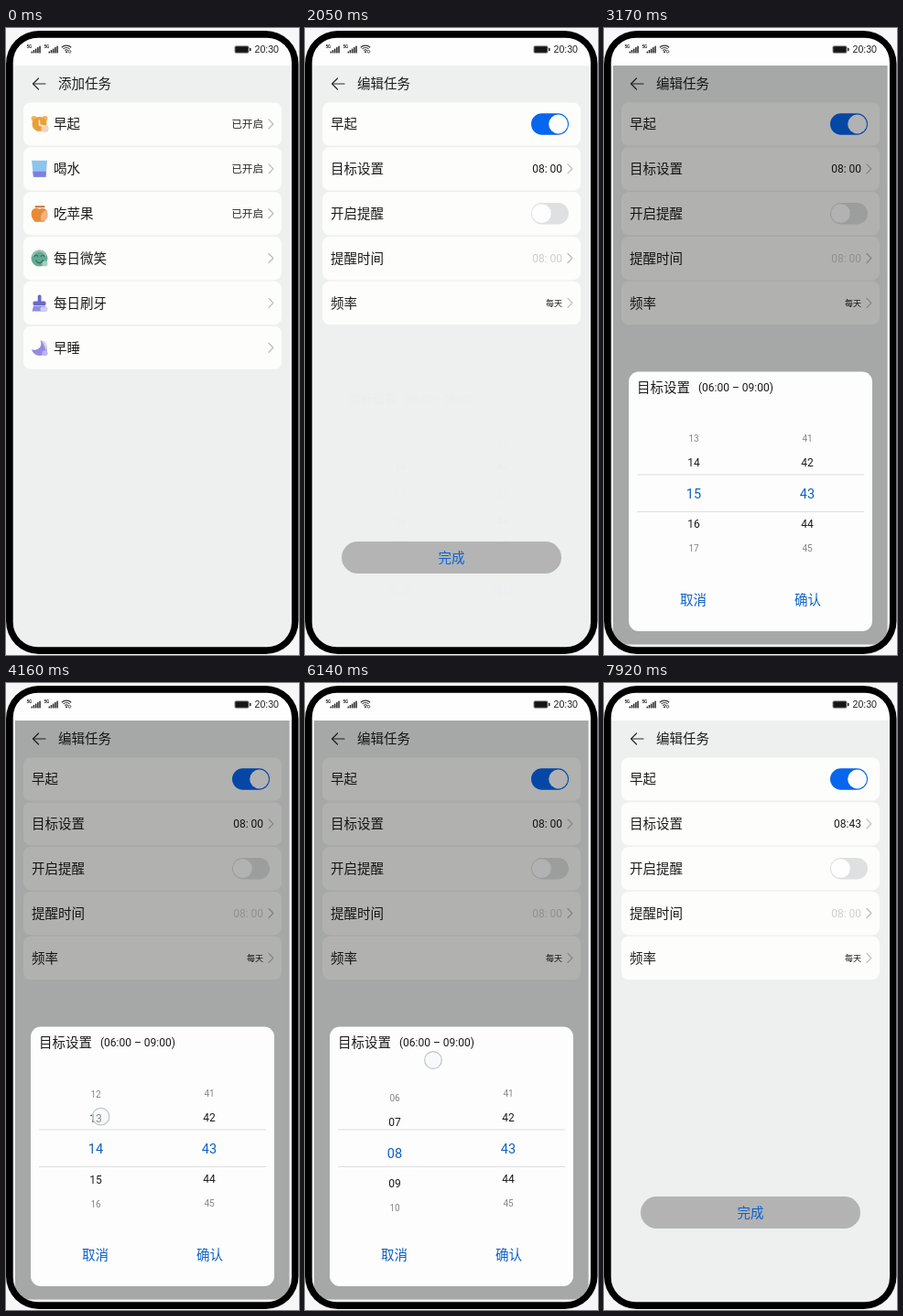
Write an HTML page with a canvas that moves like this. It is 320 by 685 pixels and loops after 8 s.

```html
<!DOCTYPE html>
<html lang="zh">
<head>
<meta charset="utf-8">
<title>添加任务</title>
<style>
html, body { margin: 0; width: 100%; height: 100%; overflow: hidden; background: #f7f7fa; }
canvas { display: block; width: 320px; height: 685px; }
</style>
</head>
<body>
<canvas id="stage"></canvas>
<script>
const W = 320, H = 685, LOOP = 8000;
const canvas = document.getElementById('stage');
const c = canvas.getContext('2d');
const dpr = window.devicePixelRatio || 1;
canvas.width = W * dpr;
canvas.height = H * dpr;

const CJK = '"Noto Sans CJK SC", "Noto Sans CJK", sans-serif';
const NUM = 'Roboto, "Noto Sans CJK SC", sans-serif';
const BLUE = '#0b5fc4', INK = '#1b1b1c';
const TASKS = ['早起', '喝水', '吃苹果', '每日微笑', '每日刷牙', '早睡'];
const SETTINGS = ['早起', '目标设置', '开启提醒', '提醒时间', '频率'];

// Each swipe: start time, x, y, hour before, hour after
const SWIPES = [
  [3420, 100, 468, 15, 14],
  [4130, 103, 472, 14, 12],
  [4800, 106, 468, 12, 10],
  [5430, 108, 466, 10, 8]
];
const DRAG = 330, SETTLE = 500;

const clamp = x => Math.max(0, Math.min(1, x));
const span = (t, a, b) => clamp((t - a) / (b - a));
const easeOut = x => 1 - (1 - x) ** 3;
const smooth = x => x * x * (3 - 2 * x);
const rowY = i => 105 + i * 48.85;

function text(s, x, y, size, color, o = {}) {
  c.font = `${o.weight || 400} ${size}px ${o.font || CJK}`;
  c.textAlign = o.align || 'left';
  c.fillStyle = color;
  c.fillText(s, x, y + size * 0.365);
}

function box(x, y, w, h, r, color) {
  c.fillStyle = color;
  c.beginPath();
  c.roundRect(x, y, w, h, r);
  c.fill();
}

function disc(x, y, r, color) {
  c.fillStyle = color;
  c.beginPath();
  c.arc(x, y, r, 0, 7);
  c.fill();
}

function line(points, color, width) {
  c.strokeStyle = color;
  c.lineWidth = width;
  c.lineCap = c.lineJoin = 'round';
  c.beginPath();
  points.forEach(([x, y], i) => i ? c.lineTo(x, y) : c.moveTo(x, y));
  c.stroke();
}

function arc(x, y, r, a, b, color, width) {
  c.strokeStyle = color;
  c.lineWidth = width;
  c.beginPath();
  c.arc(x, y, r, a, b);
  c.stroke();
}

function shape(path, color) {
  c.fillStyle = color;
  c.fill(new Path2D(path));
}

function chevron(y) {
  line([[287, y - 5], [291.8, y], [287, y + 5]], '#bdbdbf', 1.3);
}

function toggle(y, on) {
  box(247, y - 11.7, 41, 23.4, 11.7, on ? '#0766ee' : '#dfe0e1');
  disc(on ? 276.6 : 258.4, y, 10.4, '#fefefe');
}

// Icons are drawn around 0,0
const icons = [
  () => {
    disc(-6, -6, 3, '#f0b45a');
    disc(6, -6, 3, '#f0b45a');
    disc(0, 0, 8, '#e9a03b');
    disc(6, 5, 4, '#f2d3bd');
    line([[0, -4], [0, 1], [4, 2]], '#fff3df', 1.5);
  },
  () => {
    shape('M-8.5 -9H8.5L7 9H-6.5Z', '#8cc4ee');
    shape('M-7.3 3H7.4L7 9H-6.5Z', '#7d7fe0');
  },
  () => {
    shape('M0 -5C10 -9 11 3 5 9H-5C-12 2 -9 -9 0 -5Z', '#e98a35');
    shape('M2 8C0 0 5 -4 8 -3C11 3 8 9 2 8Z', '#f0b189');
    line([[-4, -7.5], [5, -7.5]], '#b8763c', 2);
  },
  () => {
    disc(0, 0, 9, '#62ab93');
    arc(0, 0, 8, 3.5, 5.9, '#9fbfb3', 2);
    disc(6, 6, 3, '#a9cfc2');
    arc(-3.5, -1.5, 1.8, 3.3, 6.1, '#2f6d5a', 1.2);
    arc(3.5, -1.5, 1.8, 3.3, 6.1, '#2f6d5a', 1.2);
    arc(0, 1, 4, 0.3, 2.8, '#2f6d5a', 1.3);
  },
  () => {
    box(-1.8, -9, 3.8, 9, 1.5, '#6c68c9');
    box(-7, -2, 14, 4.5, 1.5, '#6c68c9');
    shape('M-6.5 3H6.5L8 9H-8Z', '#8f8ce0');
    box(1, 4, 8, 5, 2, '#d3d0ee');
  },
  () => {
    shape('M1 -8C4 -2 -1 4 -8.5 2C-6 11 8 11 8.5 1C8.5 -3 5 -7 1 -8Z', '#9488e4');
    shape('M2 -8C9 -7 10 1 7 3C6 0 5 -4 2 -8Z', '#d5d0f1');
    disc(6, 6, 3, '#bdb5ee');
  }
];

function header(title) {
  c.fillStyle = '#eef0f0';
  c.fillRect(7, 41, 306, 640);
  line([[43, 61], [29.5, 61]], '#2a2a2b', 1.2);
  line([[35.5, 55], [29.5, 61], [35.5, 67]], '#2a2a2b', 1.2);
  text(title, 57, 61, 14.5, INK);
}

function card(i) {
  box(19, rowY(i) - 23.6, 282, 47.2, 8, '#fdfdfc');
}

function listPage() {
  header('添加任务');
  TASKS.forEach((name, i) => {
    const y = rowY(i);
    card(i);
    c.save();
    c.translate(36.5, y);
    icons[i]();
    c.restore();
    text(name, 52, y, 14.5, INK, { weight: 500 });
    if (i < 3) text('已开启', 281, y, 11.6, '#2a2a2b', { align: 'right' });
    chevron(y);
  });
}

function editPage(goal) {
  const right = { align: 'right', font: NUM };
  header('编辑任务');
  SETTINGS.forEach((name, i) => {
    card(i);
    text(name, 28, rowY(i), 14.5, INK, { weight: 500 });
  });
  toggle(rowY(0), true);
  toggle(rowY(2), false);
  text(goal, 281, rowY(1), 12, INK, right);
  text('08: 00', 281, rowY(3), 12, '#cfcfd0', right);
  text('每天', 281, rowY(4), 9, INK, { align: 'right' });
  [1, 3, 4].forEach(i => chevron(rowY(i)));
  box(40, 561, 240, 35, 17.5, '#b3b3b3');
  text('完成', 160, 578.5, 14.5, '#0a60d2', { align: 'center', weight: 500 });
}

function hourAt(t) {
  let v = 15;
  for (const [start, , , from, to] of SWIPES)
    if (t >= start) v = from + (to - from) * smooth(span(t, start, start + SETTLE));
  return v - 0.16 * Math.sin(Math.PI * span(t, 6050, 6230));
}

function wheel(x, value) {
  const near = Math.round(value);
  const shift = (near - value) * 31;
  const rows = [[-60, 10, '#858586'], [-34, 12, INK], [0, 14.5, BLUE], [33.5, 12, INK], [60, 10, '#858586']];
  rows.forEach(([dy, size, color], i) => {
    const label = String(near + i - 2).padStart(2, '0');
    text(label, x, 508.5 + dy + shift, size, color, { align: 'center', font: NUM });
  });
}

function dialog(hour, scale, alpha, topLine) {
  const mid = { align: 'center', weight: 500 };
  c.save();
  c.globalAlpha = alpha;
  c.translate(160, 517);
  c.scale(scale, scale);
  c.translate(-160, -517);
  box(27, 375.5, 266, 283.5, 11, '#fdfdfd');
  text('目标设置', 36, 393, 14.5, INK, { weight: 500 });
  text('(06:00 – 09:00)', 103, 393, 12, INK, { font: NUM });
  c.save();
  c.beginPath();
  c.rect(36, 436, 248, 143);
  c.clip();
  wheel(98, hour);
  wheel(222, 43);
  c.restore();
  c.fillStyle = '#dedede';
  c.fillRect(36, 528, 248, 1);
  c.globalAlpha = alpha * topLine;
  c.fillRect(36, 487.5, 248, 1);
  c.globalAlpha = alpha;
  text('取消', 97.5, 625, 14.5, BLUE, mid);
  text('确认', 222.5, 625, 14.5, BLUE, mid);
  c.restore();
}

function ring(x, y) {
  disc(x, y, 9.3, 'rgba(244,246,250,.5)');
  arc(x, y, 9.3, 0, 7, '#bfc4cf', 1.2);
}

function touch(t) {
  for (const [start, x, y] of SWIPES) {
    const k = (t - start) / DRAG;
    if (k >= 0 && k < 1) ring(x + 6 * k, y + 66 * smooth(k));
  }
  if (t >= 6050 && t < 6220) ring(140, 407 + 5 * Math.sin(Math.PI * span(t, 6050, 6230)));
}

function signal(x) {
  text('5G', x, 20.5, 4.5, '#222', { font: NUM, weight: 700 });
  for (let i = 0; i < 5; i++) box(x + 5 + i * 2.2, 25.5 - i * 1.5, 1.5, 2 + i * 1.5, 0.4, '#262626');
}

function statusBar() {
  c.fillStyle = '#fefefe';
  c.fillRect(7, 10, 306, 31);
  signal(22.5);
  signal(41.5);
  for (const r of [2.6, 5, 7.4]) arc(66, 26.5, r, -2.35, -0.79, '#333', 1.1);
  disc(66, 26.3, 1, '#333');
  arc(69.5, 25.8, 1.4, 0, 7, '#333', 0.8);
  box(249.5, 19.3, 16, 8.4, 2, '#858585');
  box(250.5, 20.3, 14, 6.4, 1, '#161616');
  box(266, 21.8, 1.6, 3.4, 0.6, '#333');
  text('20:30', 298, 23.3, 10.6, '#222', { align: 'right', font: '"Liberation Sans", Arial, sans-serif' });
}

function pages(t) {
  const k = easeOut(span(t, 250, 600));
  const goal = t < 7210 ? '08: 00' : '08:43';
  c.save();
  if (k < 1) {
    c.translate(-304 * k, 0);
    listPage();
    c.translate(304, 0);
  }
  if (k > 0) editPage(goal);
  c.restore();
}

function popup(t) {
  const open = span(t, 2050, 2400), close = span(t, 7210, 7510);
  if (open === 0 || close === 1) return;
  const fade = 1 - close ** 1.8;
  const grow = easeOut(clamp(open * 2));
  c.fillStyle = `rgba(0,0,0,${0.3 * Math.sin(open * Math.PI / 2) * fade})`;
  c.fillRect(10, 41, 299.5, 632.5);
  const topLine = close > 0 ? 0 : span(open, 0.55, 1);
  dialog(close > 0 ? 15 : hourAt(t), 0.9 + 0.1 * grow - 0.1 * close, grow * fade, topLine);
  touch(t);
}

function draw(t) {
  c.setTransform(dpr, 0, 0, dpr, 0, 0);
  c.fillStyle = '#f7f7fa';
  c.fillRect(0, 0, W, H);
  box(0, 3, 319.5, 681, 36, '#000');
  c.save();
  c.beginPath();
  c.roundRect(7.7, 10.7, 304.3, 665.5, 27);
  c.clip();
  pages(t);
  popup(t);
  statusBar();
  c.restore();
}

const begin = performance.now();
function frame() {
  draw((performance.now() - begin) % LOOP);
  requestAnimationFrame(frame);
}
frame();
</script>
</body>
</html>
```
